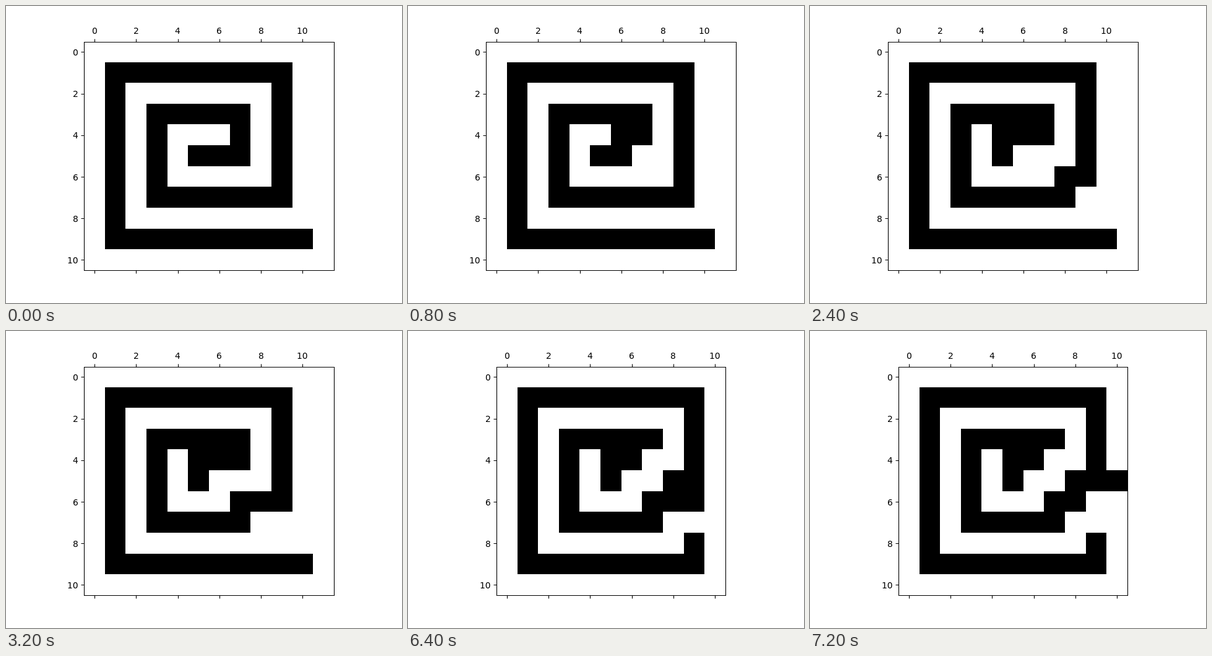
These frames come from a looping animation (640 by 480 pixels, 8000 ms). An HTML page:

```html
<!DOCTYPE html>
<html lang="en">
<head>
<meta charset="utf-8">
<title>Spiral moves</title>
<style>
  html, body { margin: 0; width: 100%; height: 100%; overflow: hidden; background: #fff; }
  svg { display: block; width: 640px; height: 480px; }
  text { font: 13.89px "DejaVu Sans", sans-serif; }
  #axes { fill: none; stroke: #000; stroke-width: 1.11; }
  #cells { shape-rendering: crispEdges; }
</style>
</head>
<body>
<svg viewBox="0 0 640 480">
  <path id="cells"/>
  <path id="axes"/>
  <g id="labels"></g>
</svg>
<script>
const LOOP = 8000;
const ROWS = 11, PITCH = 33.6, TOP = 57.6, CENTER_X = 328;
const TICK = 5, LABEL_GAP = 9.72, DIGIT_WIDTH = 8.837;

// Straight runs of filled cells: first row, first column, last row, last column.
const RUNS = [
  [1, 1, 1, 9], [1, 1, 9, 1], [9, 1, 9, 10], [1, 9, 7, 9], [7, 3, 7, 9],
  [3, 3, 7, 3], [3, 3, 3, 7], [3, 7, 5, 7], [5, 5, 5, 7]
];

// Each move takes one cell to its diagonal neighbour.
const MOVES = [
  { at: 800, from: [5, 7], to: [4, 6] },
  { at: 1600, from: [7, 9], to: [6, 8] },
  { at: 2400, from: [5, 6], to: [4, 5] },
  { at: 3200, from: [7, 8], to: [6, 7] },
  { at: 5600, from: [9, 10], to: [8, 9] },
  { at: 6400, from: [4, 7], to: [5, 8] },
  { at: 7200, from: [6, 9], to: [5, 10] }
];

const byId = id => document.getElementById(id);
const snap = v => Math.round(v) + 0.5;
const evens = [0, 2, 4, 6, 8, 10];

function filledCells(moveCount) {
  const cells = new Set();
  for (const [r0, c0, r1, c1] of RUNS)
    for (let r = r0; r <= r1; r++)
      for (let c = c0; c <= c1; c++) cells.add(r + "," + c);
  for (const { from, to } of MOVES.slice(0, moveCount)) {
    cells.delete(from.join());
    cells.add(to.join());
  }
  return [...cells].map(key => key.split(",").map(Number));
}

// Edges of the cells on whole pixels; the image fills a rounded-up pixel size.
function edges(start, count) {
  const size = Math.ceil(PITCH * count) / count;
  return i => Math.round(Math.floor(start) - 0.1 + size * i);
}

function drawCells(cells, left, columns) {
  const x = edges(left, columns), y = edges(TOP, ROWS);
  byId("cells").setAttribute("d", cells.map(([r, c]) =>
    `M${x(c)} ${y(r)}H${x(c + 1)}V${y(r + 1)}H${x(c)}Z`).join(""));
}

function drawAxes(left, columns) {
  const x0 = snap(left), x1 = snap(left + PITCH * columns);
  const y0 = snap(TOP), y1 = snap(TOP + PITCH * ROWS);
  let path = `M${x0} ${y0}H${x1}V${y1}H${x0}Z`;
  let labels = "";
  const addLabel = (n, x, y) =>
    labels += `<text x="${Math.round(x)}" y="${Math.round(y)}">${n}</text>`;

  for (const n of evens) {
    const x = left + PITCH * (n + 0.5), y = TOP + PITCH * (n + 0.5);
    const width = DIGIT_WIDTH * String(n).length;
    path += `M${snap(x)} ${y0}v${-TICK}M${snap(x)} ${y1}v${TICK}M${x0} ${snap(y)}h${-TICK}`;
    addLabel(n, x - width / 2, 45);
    addLabel(n, left - LABEL_GAP - width, y + 5.51);
  }
  byId("axes").setAttribute("d", path);
  byId("labels").innerHTML = labels;
}

let shownMoves = -1;

function render(time) {
  const moveCount = MOVES.filter(move => time >= move.at).length;
  if (moveCount === shownMoves) return;
  shownMoves = moveCount;
  const cells = filledCells(moveCount);
  const columns = time < 5600 ? 12 : 11;
  const left = CENTER_X - PITCH * columns / 2;
  drawCells(cells, left, columns);
  drawAxes(left, columns);
}

const start = performance.now();
function tick() {
  render((performance.now() - start) % LOOP);
  requestAnimationFrame(tick);
}
tick();
</script>
</body>
</html>
```
